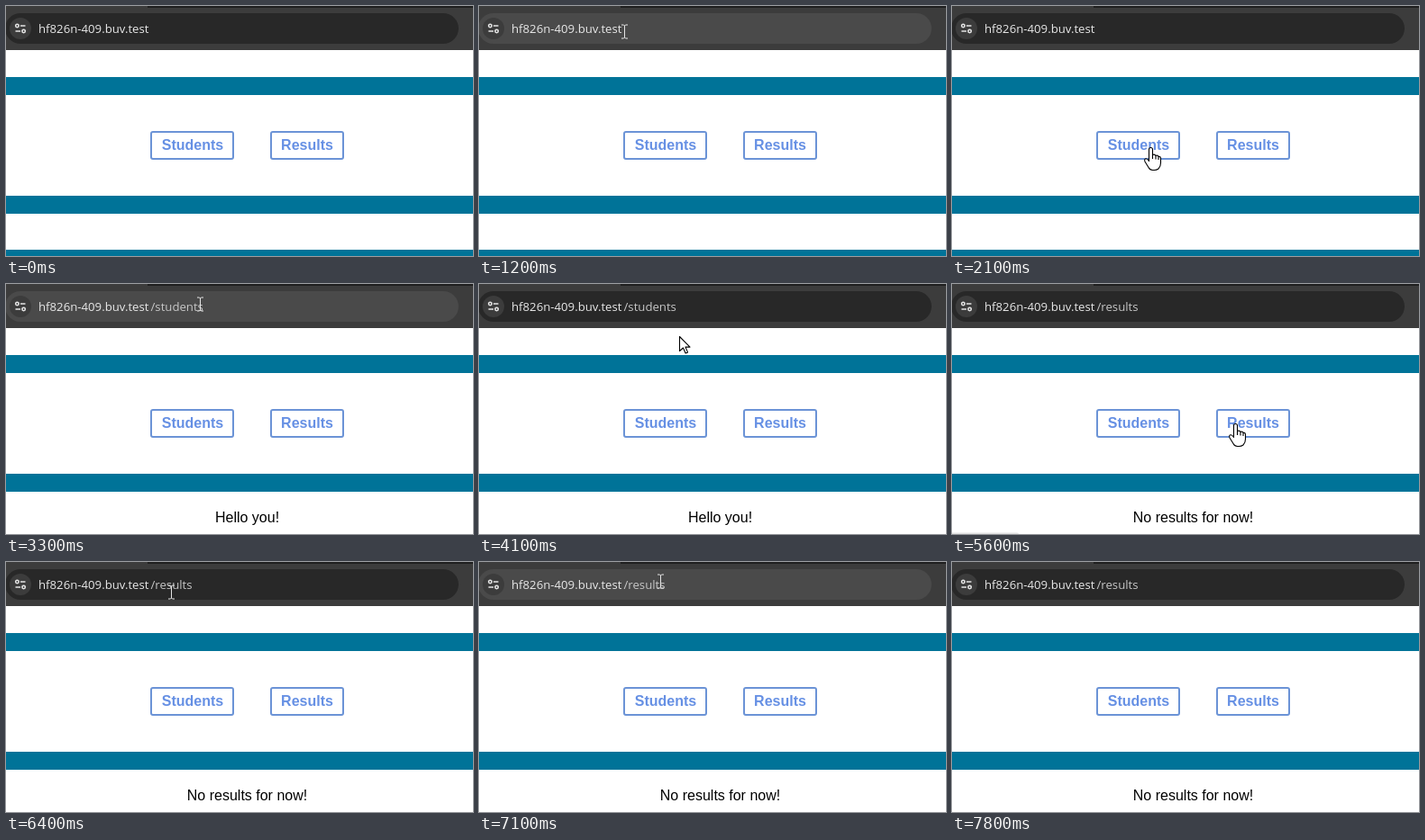
Animation, 518 px wide and 278 px high, one loop 7.9 s. Source, as an HTML page:

```html
<!DOCTYPE html>
<html lang="en">
<head>
<meta charset="utf-8">
<title>Page navigation</title>
<style>
  html, body { margin: 0; width: 100%; height: 100%; overflow: hidden; background: #fff; }
  svg { display: block; width: 518px; height: 278px; }
  .url { font: 13.2px "Open Sans", "Noto Sans", sans-serif; fill: #e8e8e8; }
  #path { fill: #c7c7c7; }
  .page { font: 16px "Liberation Sans", Arial, sans-serif; fill: #000; text-anchor: middle; }
  .link { font: bold 16px "Liberation Sans", Arial, sans-serif; fill: #6690e4; text-anchor: middle; }
  .box { fill: #fff; stroke: #6b93d6; stroke-width: 2; }
  .band { fill: #007398; }
  .icon { fill: none; stroke: #e3e3e3; stroke-width: 1.6; }
  .pointer { fill: #fff; stroke: #000; stroke-width: 1.1; stroke-linejoin: round; }
</style>
</head>
<body>
<svg viewBox="0 0 518 278">
  <rect width="518" height="49" fill="#3c3c3c"/>
  <rect x="157" width="361" height="2" fill="#1f1f1f"/>
  <rect id="pill" x="-1" y="8" width="503" height="34" rx="17"/>
  <circle cx="16" cy="25" r="12" fill="#3c3c3c"/>
  <g class="icon">
    <circle cx="12.4" cy="22" r="1.7"/>
    <path d="M16 22h5.5M10.5 28h5.5"/>
    <circle cx="19.6" cy="28" r="1.7"/>
  </g>
  <text class="url" x="36" y="30">hf826n-409.buv.test</text>
  <text class="url" id="path" x="160.5" y="30"></text>

  <rect class="band" y="79" width="518" height="20"/>
  <rect class="band" y="211" width="518" height="20"/>
  <rect class="band" id="footer" y="271" width="518" height="7"/>
  <rect class="box" x="161" y="140" width="91" height="30" rx="2"/>
  <rect class="box" x="294" y="140" width="80" height="30" rx="2"/>
  <text class="link" x="207" y="160">Students</text>
  <text class="link" x="334" y="160">Results</text>
  <text class="page" id="message" x="267.5" y="265"></text>
  <path id="status" d="M0 276.5H72Q74 276.5 74 278H0Z" fill="#e4e4e4"/>

  <g id="cursor">
    <path id="beam" fill="none" stroke="#e6e6e6" d="M-3.5 -7.5H-1L0 -6.5L1 -7.5H3.5M0 -6.5V6.5M-3.5 7.5H-1L0 6.5L1 7.5H3.5"/>
    <path id="arrow" class="pointer" d="M0 0V16L4 12.5L6.6 18.5L9 17.4L6.5 11.6H11.5Z"/>
    <g id="hand" class="pointer">
      <path d="M-2 12V1Q-2 -1 0 -1T2 1V7Q4.500 6 5.500 8Q7.700 7 8.500 9Q11 8.500 11 11V16Q11 20 8.500 22.500Q6.500 24 4 24H2Q-1 24 -2.500 21L-6.500 14.500Q-7.500 12 -5.500 11.300Q-4 11 -2 14Z"/>
      <path fill="none" d="M2 7V11.500M5.500 8V12M8.500 9V12.500"/>
    </g>
  </g>
</svg>
<script>
  const LOOP = 7900, STEP = 100;
  const $ = id => document.getElementById(id);

  // time, x, y, shape until the next stop
  const stops = [
    [0, 225, 18, ""],
    [400, 225, 18, "beam"],
    [800, 168, 26, "beam"],
    [1200, 161, 28, "beam"],
    [1600, 168, 29, "beam"],
    [1700, 178, 58, "arrow"],
    [2000, 218, 148, "hand"],
    [2100, 220, 158, "hand"],
    [2800, 220, 158, "hand"],
    [2900, 219, 120, "arrow"],
    [3100, 216, 18, "beam"],
    [3300, 215, 22, "beam"],
    [4000, 208, 28, "beam"],
    [4100, 222, 58, "arrow"],
    [4600, 306, 148, "arrow"],
    [4800, 314, 156, "arrow"],
    [4900, 314, 156, "hand"],
    [5900, 314, 156, "hand"],
    [6000, 284, 126, "arrow"],
    [6300, 196, 50, "arrow"],
    [6400, 183, 33, "beam"],
    [6700, 185, 26, "beam"],
    [7200, 205, 20, "beam"],
    [7400, 225, 17, ""],
    [LOOP, 225, 17, ""]
  ];
  const within = (t, ...spans) => spans.some(([a, b]) => t >= a && t < b);
  const show = (id, on) => { $(id).style.display = on ? "" : "none"; };

  function drawCursor(t) {
    const i = stops.findIndex(s => s[0] > t) - 1;
    const [t0, x0, y0, shape] = stops[i], [t1, x1, y1] = stops[i + 1];
    const k = (t - t0) / (t1 - t0);
    const x = Math.round(x0 + (x1 - x0) * k) + 0.5;
    const y = Math.round(y0 + (y1 - y0) * k) + 0.5;
    $("cursor").setAttribute("transform", `translate(${x} ${y})`);
    for (const id of ["beam", "arrow", "hand"]) show(id, id === shape);
  }

  function draw(t) {
    const route = t < 2600 ? "" : t < 5200 ? "/students" : "/results";
    const lit = within(t, [500, 1700], [3200, 4100], [6500, 7400]);
    $("pill").setAttribute("fill", lit ? "#4a4a4a" : "#282828");
    $("path").textContent = route;
    $("message").textContent = { "/students": "Hello you!", "/results": "No results for now!" }[route] || "";
    show("footer", !route);
    show("status", within(t, [2200, 3300], [4800, 6100]));
    drawCursor(t);
  }

  const start = performance.now();
  function tick() {
    const t = (performance.now() - start) % LOOP;
    draw(Math.floor(t / STEP) * STEP);
    requestAnimationFrame(tick);
  }
  tick();
</script>
</body>
</html>
```
